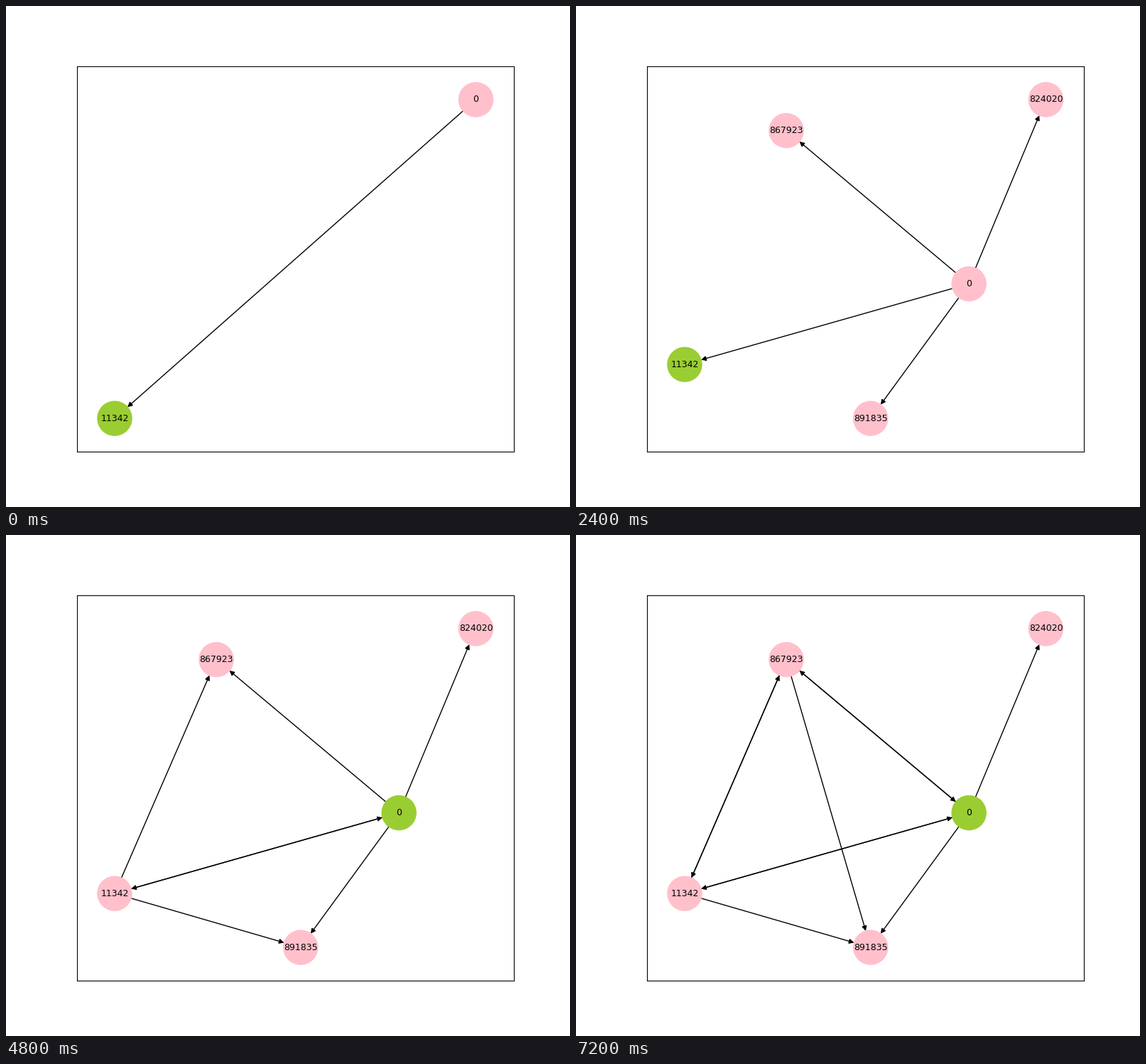
A matplotlib script that plays this animation: 794 by 706 pixels, repeating every 8 s.

```python
import matplotlib.pyplot as plt
from matplotlib.animation import FuncAnimation
from matplotlib.patches import FancyArrowPatch

WIDTH, HEIGHT, DPI = 794, 706, 100
NODE_SIZE = 1200
STEP_MS = 800
PAD = (1.1 ** 2 - 1) / 2  # two 5 % margins on each side

# Key points of the full layout; the view rescales to the visible nodes.
POS = {
    0: (0.787, 0.4222),
    11342: (0.0, 0.1691),
    824020: (1.0, 1.0),
    867923: (0.2814, 0.9028),
    891835: (0.5147, 0.0),
}
ROOT, LEAF = 0, 824020
SOURCES = ROOT, 11342, 867923

# Each source links to every other node in turn; only the root reaches the leaf.
EDGES = [(a, b) for a in SOURCES for b in POS
         if a != b and (a == ROOT or b != LEAF)]

fig = plt.figure(figsize=(WIDTH / DPI, HEIGHT / DPI), dpi=DPI)
shift = 0.3 / WIDTH
fig.subplots_adjust(left=0.125 + shift, right=0.9 + shift, bottom=0.11, top=0.88)
ax = fig.add_subplot()


def padded(values):
    low, high = min(values), max(values)
    pad = PAD * (high - low)
    return low - pad, high + pad


def draw(step):
    edges = EDGES[:step + 1]
    nodes = [n for n in POS if any(n in edge for edge in edges)]
    source = edges[-1][0]
    active = next(n for n in nodes if n != source)
    xs, ys = zip(*(POS[n] for n in nodes))

    ax.clear()
    ax.set(xticks=[], yticks=[], xlim=padded(xs), ylim=padded(ys))

    shrink = NODE_SIZE ** 0.5 / 2
    for a, b in edges:
        ax.add_patch(FancyArrowPatch(
            POS[a], POS[b], arrowstyle="-|>", mutation_scale=10,
            shrinkA=shrink, shrinkB=shrink, color="black", lw=1, zorder=1))

    colors = ["yellowgreen" if n == active else "pink" for n in nodes]
    ax.scatter(xs, ys, s=NODE_SIZE, c=colors, zorder=2)
    for n in nodes:
        ax.text(*POS[n], str(n), size=9, ha="center", va="center",
                family="DejaVu Sans", zorder=3)
    return []


anim = FuncAnimation(fig, draw, frames=len(EDGES), interval=STEP_MS,
                     init_func=lambda: draw(0), repeat=True, repeat_delay=0)
plt.show()
```
